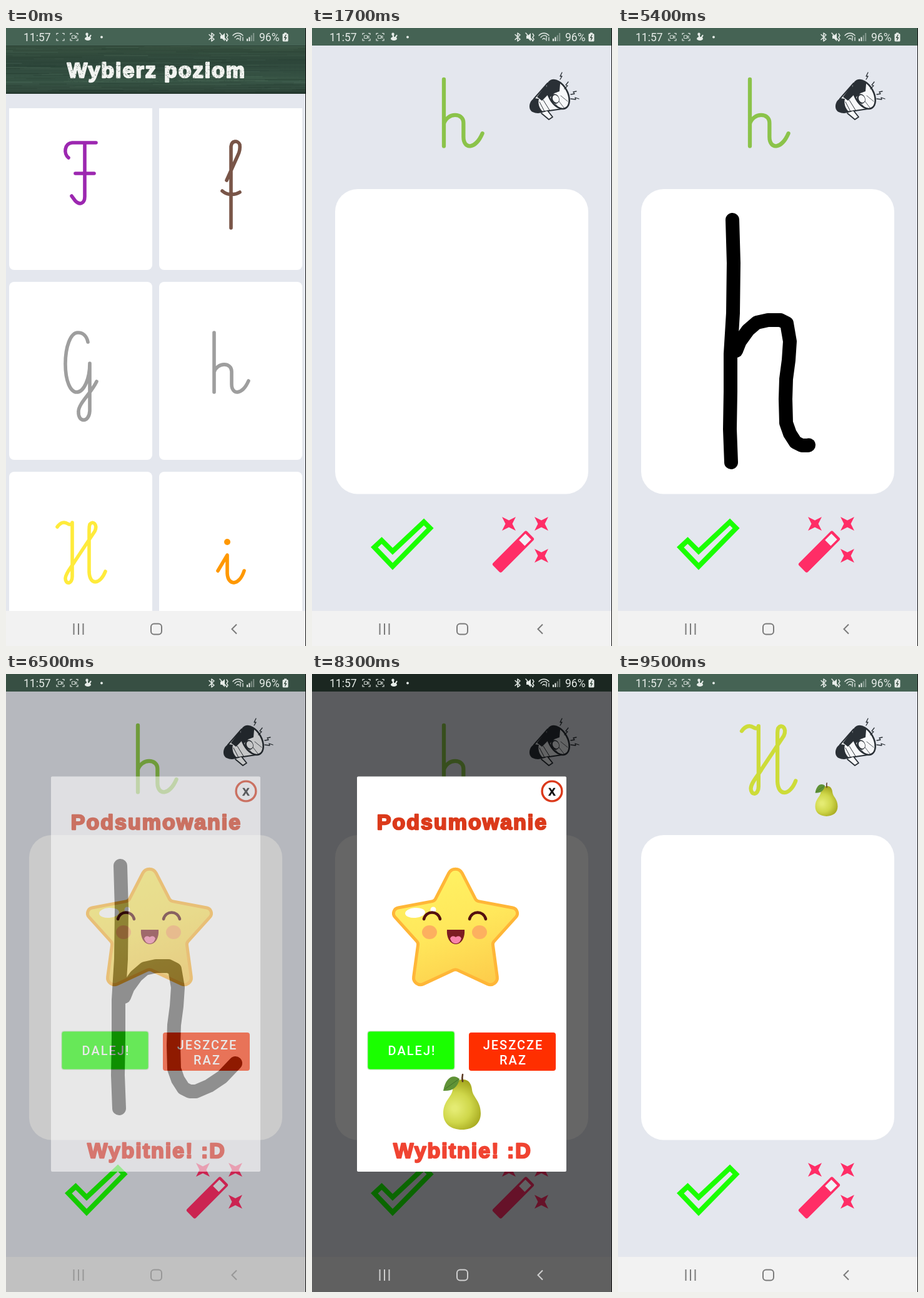
Recreate the animation shown at these times as an HTML page with a canvas. Size 480 px wide and 986 px high, loop 9600 ms.

```html
<!DOCTYPE html>
<html lang="pl">
<head>
<meta charset="utf-8">
<title>Wybierz poziom</title>
<style>
html, body { margin: 0; width: 100%; height: 100%; overflow: hidden; background: #e4e7ee; }
canvas { display: block; }
</style>
</head>
<body>
<canvas id="stage" width="480" height="986"></canvas>
<script>
const W = 480, H = 986, LOOP = 9600, TAU = Math.PI * 2;
const BG = '#e4e7ee', BAR = '#456354', INK = '#2a3036', LIME = '#1aff00', PINK = '#ff2d66', RED = '#db3a1b';
const stage = document.getElementById('stage').getContext('2d');
const HEADING = '"Liberation Sans", Arial, sans-serif';
const LABEL = 'Roboto, sans-serif';

const clamp = v => Math.max(0, Math.min(1, v));
const ramp = (t, from, to) => clamp((t - from) / (to - from));

function layer(paint) {
  const c = document.createElement('canvas');
  c.width = W;
  c.height = H;
  paint(c.getContext('2d'));
  return c;
}

function rect(g, x, y, w, h, color) {
  g.fillStyle = color;
  g.fillRect(x, y, w, h);
}

function round(g, x, y, w, h, r, color) {
  g.fillStyle = color;
  g.beginPath();
  g.roundRect(x, y, w, h, r);
  g.fill();
}

function oval(g, x, y, rx, ry, color, turn = 0) {
  g.fillStyle = color;
  g.beginPath();
  g.ellipse(x, y, rx, ry, turn, 0, TAU);
  g.fill();
}

function line(g, path, width, color, cap = 'round', join = 'round') {
  g.strokeStyle = color;
  g.lineWidth = width;
  g.lineCap = cap;
  g.lineJoin = join;
  g.stroke(new Path2D(path));
}

function shape(g, path, color) {
  g.fillStyle = color;
  g.fill(new Path2D(path));
}

function text(g, str, x, y, font, color, { align = 'center', gap = 0, bold = 0 } = {}) {
  g.font = font;
  g.textAlign = align;
  g.letterSpacing = gap + 'px';
  g.fillStyle = color;
  g.fillText(str, x, y);
  if (bold) {
    g.strokeStyle = color;
    g.lineWidth = bold;
    g.lineJoin = 'round';
    g.strokeText(str, x, y);
  }
  g.letterSpacing = '0px';
}

// Chunky, rounded heading
const heading = (g, str, x, y, color) =>
  text(g, str, x, y, `bold 34px ${HEADING}`, color, { gap: 2, bold: 2.4 });

// Letters, each relative to its first pen point
const LETTERS = {
  F: 'M0 0C-8-6-7-23 6-24H44M26-24V62C26 73 18 76 11 69L5 61M11 25H41',
  f: 'M0 0V-130C1-140 11-140 14-133C15-126 13-120 11-116L-7-76M-14-59C-6-52 6-52 14-57',
  G: 'M0 0C-2-10-8-15-16-15C-28-15-36 8-36 35C-36 62-28 80-18 80C-6 80 3 58 3 34V110C2 129-16 129-15 111C-15 98 5 82 14 63',
  h: 'M0 0V95M0 63C5 47 28 47 28 62V82C28 100 45 100 55 77',
  H: 'M0 0C5-7 11-9 17-5C20-3 24-4 24-7V79C24 92 13 92 13 82C13 74 24 62 28 55L60 7C65-4 57-11 52-4C51-1 51 2 51 5V72C52 94 69 92 77 71',
  i: 'M0 0L15-25V4C16 24 34 25 42 0'
};

function letter(g, name, x, y, color, scale = 1) {
  g.save();
  g.translate(x, y);
  g.scale(scale, scale);
  line(g, LETTERS[name], 5.6, color);
  if (name === 'i') oval(g, 15, -46, 5, 5, color);
  g.restore();
}

function bars(g) {
  rect(g, 0, 0, W, H, BG);
  rect(g, 0, 0, W, 28, BAR);
  rect(g, 0, 930, W, 56, '#f2f2f2');
}

function randomizer(seed) {
  return () => (seed = seed * 16807 % 2147483647) / 2147483647;
}

function chalkboard(g) {
  const rnd = randomizer(7);
  const wash = g.createLinearGradient(0, 28, 0, 105);
  wash.addColorStop(0, '#36503f');
  wash.addColorStop(0.35, '#2d463a');
  wash.addColorStop(0.75, '#385546');
  wash.addColorStop(1, '#2a3f34');
  rect(g, 0, 28, W, 77, wash);
  for (let i = 0; i < 170; i++) {
    const tone = rnd() < 0.55 ? '15,32,24' : '105,140,120';
    rect(g, rnd() * 560 - 80, 28 + rnd() * 76, 30 + rnd() * 130, 0.6 + rnd(), `rgba(${tone},${0.05 + rnd() * 0.14})`);
  }
  rect(g, 0, 28, W, 1, '#2a4034');
  rect(g, 0, 103, W, 2, '#22352b');
}

function chalkDust(g) {
  const rnd = randomizer(31);
  for (let i = 0; i < 420; i++)
    rect(g, 98 + rnd() * 284, 50 + rnd() * 36, 1 + rnd(), 1, 'rgba(48,72,59,.55)');
}

const listPage = layer(g => {
  bars(g);
  chalkboard(g);
  heading(g, 'Wybierz poziom', 241, 79, '#f1f3f0');
  chalkDust(g);
  g.save();
  g.beginPath();
  g.rect(0, 128, W, 802);
  g.clip();
  for (const y of [102, 405, 708])
    for (const x of [5, 245]) round(g, x, y, 229, 284, 8, '#fff');
  letter(g, 'F', 100, 207, '#9c27b0');
  letter(g, 'f', 360, 319, '#795548');
  letter(g, 'G', 131, 501, '#9e9e9e');
  letter(g, 'h', 333, 486, '#9e9e9e');
  letter(g, 'H', 82, 796, '#ffeb3b');
  letter(g, 'i', 339, 866, '#ff9800');
  g.restore();
});

function megaphone(g) {
  const white = '#f7f8fa', tilt = -0.5;
  shape(g, 'M355 113L377 88L398 129L366 134Z', white);
  line(g, 'M355 113L377 88M366 134L400 129', 2, INK);
  shape(g, 'M374 91L360 110L368 116L380 104Z', INK);
  line(g, 'M372 133L364 118M380 131L370 115', 1, INK);
  shape(g, 'M356 112C347 116 345 130 353 134C359 137 366 136 370 134C364 129 361 121 363 113Z', INK);
  shape(g, 'M367 136L379 146L385 142L377 132Z', white);
  line(g, 'M367 136L379 146L385 142L377 132', 1.8, INK);

  g.save();
  g.beginPath();
  g.ellipse(394, 106, 15.5, 25, tilt, 0, TAU);
  g.fillStyle = white;
  g.fill();
  g.clip();
  shape(g, 'M370 78H398L396 101L388 104L377 114Z', INK);
  line(g, 'M392 113L403 127M387 118L397 130M398 108L409 117', 0.8, INK);
  oval(g, 389, 113, 6.5, 8, INK, tilt);
  oval(g, 390, 113, 4.8, 6.2, white, tilt);
  g.restore();
  g.strokeStyle = INK;
  g.lineWidth = 2.6;
  g.beginPath();
  g.ellipse(394, 106, 15, 24.8, tilt, 0, TAU);
  g.stroke();

  line(g, 'M400 71L397 77H400L397 82M410 86L406 91L409 92L404 97M423 101L418 102L420 105L414 106M427 113L421 111L422 114L414 113', 1.3, INK);
}

function wand(g) {
  g.save();
  g.translate(322, 835.5);
  g.rotate(-Math.PI / 4);
  round(g, -38.5, -10, 77, 20, 3, PINK);
  rect(g, 19.5, -6.5, 14.5, 13, '#f1f2f7');
  g.restore();
  for (const [x, y] of [[315, 791], [367, 791], [367, 842]])
    shape(g, `M${x - 11} ${y - 11}l11 5.5l11-5.5l-5.5 11l5.5 11l-11-5.5l-11 5.5l5.5-11Z`, PINK);
}

const lesson = (name, x, y, color) => layer(g => {
  bars(g);
  letter(g, name, x, y, color, 1.12);
  megaphone(g);
  round(g, 37, 257, 405, 486.5, 36, '#fff');
  line(g, 'M99.7 828.5L111.5 817.5L129 835L179 788L189 798L129 859Z', 8, LIME, 'butt', 'miter');
  wand(g);
});

const smallH = lesson('h', 211, 82, '#8bc34a');
const bigH = lesson('H', 198, 91, '#cddc39');

function star(g) {
  const half = [[229.5, 297, 12], [263, 362, 7], [337, 376, 9], [289, 429, 7], [299, 503, 11], [229.5, 471, 7]];
  const pts = half.concat(half.slice(1, 5).reverse().map(([x, y, r]) => [459 - x, y, r]));
  const mid = (a, b) => [(a[0] + b[0]) / 2, (a[1] + b[1]) / 2];
  g.beginPath();
  g.moveTo(...mid(pts[9], pts[0]));
  pts.forEach((p, i) => g.arcTo(p[0], p[1], ...mid(p, pts[(i + 1) % 10]), p[2]));
  g.closePath();
  const glow = g.createLinearGradient(200, 310, 270, 495);
  glow.addColorStop(0, '#fff263');
  glow.addColorStop(0.5, '#ffe75b');
  glow.addColorStop(1, '#fdcd4b');
  g.fillStyle = glow;
  g.fill();
  g.strokeStyle = '#ffb637';
  g.lineWidth = 5;
  g.lineJoin = 'round';
  g.stroke();
  oval(g, 165, 381, 16, 8, '#fff', -0.08);
  oval(g, 194, 376, 4.5, 4.5, '#fff');
  oval(g, 188, 412, 12, 11, '#fdb05f');
  oval(g, 268, 412, 12, 11, '#fdb05f');
  line(g, 'M179 391C183 377 201 377 205 391M252 391C256 377 274 377 278 391', 4.6, '#54100f');
  shape(g, 'M216 408H244C245 421 239 431 230 431C221 431 215 421 216 408Z', '#7d1d22');
  shape(g, 'M221 422C223 417 228 418 230 420C232 418 237 417 239 422C237 428 234 430 230 430C226 430 223 428 221 422Z', '#f884ab');
}

const dialog = layer(g => {
  round(g, 72, 163.5, 335, 630.5, 2, '#fff');
  g.strokeStyle = RED;
  g.lineWidth = 3.4;
  g.beginPath();
  g.arc(384, 187, 15.9, 0, TAU);
  g.stroke();
  text(g, 'X', 384, 193.5, `bold 17px ${HEADING}`, '#111', { bold: 0.6 });
  heading(g, 'Podsumowanie', 240.5, 248, RED);
  star(g);
  round(g, 88.5, 569.5, 140, 62, 4, '#b9dcb4');
  round(g, 89.5, 570.5, 138, 60, 4, LIME);
  round(g, 251, 572, 139, 61, 4, '#ff2f00');
  const face = `500 20px ${LABEL}`;
  text(g, 'DALEJ!', 160, 608, face, '#fff', { gap: 2 });
  text(g, 'JESZCZE', 322, 599, face, '#fff', { gap: 2 });
  text(g, 'RAZ', 322, 623, face, '#fff', { gap: 2 });
  heading(g, 'Wybitnie! :D', 241, 772, '#f04432');
});

function pear(g, x, y, scale) {
  if (scale <= 0) return;
  g.save();
  g.translate(x, y);
  g.scale(scale, scale);
  const skin = g.createRadialGradient(-12, 10, 4, -8, 8, 44);
  skin.addColorStop(0, '#e4eb72');
  skin.addColorStop(0.5, '#cfd74a');
  skin.addColorStop(1, '#a3a51c');
  shape(g, 'M0-36C10-37 15-30 16-20C17-8 30-2 30 18C30 35 17 44 0 44C-17 44-30 35-30 18C-30-2-16-8-15-20C-14-30-9-35 0-36Z', skin);
  line(g, 'M1-33C0-37 0-40 1-44', 2.6, '#5b3a22');
  shape(g, 'M-4-37C-13-45-26-41-30-18C-16-17-7-23-4-37Z', '#5f9236');
  line(g, 'M-6-36L-27-21', 1, '#3f6f27');
  g.restore();
}

// Pen strokes
const STEM = [[183, 306], [185, 375], [184, 455], [180, 520], [180, 580], [179, 640], [181, 693]];
const ARCH = [[189, 515], [195, 500], [208, 482], [222, 470], [240, 466], [260, 466], [270, 471], [275, 500],
  [273, 530], [269, 560], [268, 592], [269, 630], [275, 647], [284, 661], [294, 666], [304, 666],
  [325, 657], [346, 643], [367, 621]];

function penStroke(g, pts, part) {
  const dist = (a, b) => Math.hypot(b[0] - a[0], b[1] - a[1]);
  let left = part * pts.slice(1).reduce((sum, p, i) => sum + dist(pts[i], p), 0);
  g.strokeStyle = '#000';
  g.lineWidth = 22;
  g.lineCap = g.lineJoin = 'round';
  g.beginPath();
  g.moveTo(...pts[0]);
  for (let i = 1; i < pts.length && left >= 0; i++) {
    const [a, b] = [pts[i - 1], pts[i]];
    const k = Math.min(1, left / dist(a, b));
    g.lineTo(a[0] + (b[0] - a[0]) * k, a[1] + (b[1] - a[1]) * k);
    left -= dist(a, b);
  }
  g.stroke();
}

function writing(g, t) {
  if (t >= 2470) penStroke(g, STEM, (1 - Math.cos(Math.PI * ramp(t, 2450, 3420))) / 2);
  if (t >= 4170) penStroke(g, ARCH, ramp(t, 4150, 5700));
}

// New page rises while the old one drifts up and darkens
function slideIn(g, t, start, oldPage, newPage) {
  const p = 1 - Math.pow(1 - ramp(t, start, start + 450), 5.1);
  g.save();
  g.translate(0, Math.round(-16 * p));
  oldPage();
  g.restore();
  rect(g, 0, 0, W, H, `rgba(0,0,0,${0.09 * p})`);
  if (p > 0) g.drawImage(newPage, 0, Math.round(H * (1 - p)));
}

const BLINKS = [[0, 100], [700, 1700], [3700, 4200], [5700, 6200], [7800, 8300]];

function statusIcons(g, t) {
  const c = '#e6ece8', dimmed = 'rgba(230,236,232,.4)';
  text(g, '11:57', 28, 21, `17.5px ${LABEL}`, c, { align: 'left' });
  text(g, '96%', 405, 21, `17.5px ${LABEL}`, c, { align: 'left' });
  const blink = BLINKS.some(([a, b]) => t >= a && t < b);
  for (const x of [81, 103]) {
    line(g, `M${x} 11V8.5H${x + 3}M${x + 9} 8.5H${x + 12}V11M${x + 12} 17V20H${x + 9}M${x + 3} 20H${x}V17`, 1.1, c, 'butt', 'miter');
    if (x === 81 && blink) continue;
    line(g, `M${x + 3} 12H${x + 7.5}V16.5H${x + 3}ZM${x + 7.5} 14.2L${x + 10} 12.5V16Z`, 0.9, c);
  }
  oval(g, 129.5, 10, 2.2, 2.4, c);
  oval(g, 131, 17, 5, 3, c);
  line(g, 'M130 12V16M135.5 12L133 16', 2.2, c);
  oval(g, 153, 14.5, 1.9, 1.9, c);
  line(g, 'M325 10.5L333 18L329 21V8L333 11L325 18.5', 1.5, c);
  shape(g, 'M343 12H346L350 8V21L346 17H343Z', c);
  line(g, 'M342 8L353 20M353 9L355 12L353 15L355 18L353 21', 1.4, c);
  line(g, 'M363 12C367 7 375 7 379 12M366 15C369 11 374 11 376 14M369 18C370 16 372 16 373 18', 1.3, c);
  line(g, 'M375 15V20M379 20V15', 1.3, c);
  [4, 6.5, 9.5, 13].forEach((h, i) => rect(g, 385 + i * 3.4, 21 - h, 2, h, i < 2 ? c : dimmed));
  round(g, 442.5, 9, 9, 12.5, 1.5, c);
  rect(g, 445, 7.5, 4, 2, c);
  line(g, 'M448 11L445.5 15.5H448.5L446.5 19', 1.3, '#34483d');
}

function navIcons(g, dim) {
  const v = Math.round(122 + 85 * dim / 0.6);
  const c = `rgb(${v},${v},${v})`;
  line(g, 'M108.5 950V968M116 950V968M123.5 950V968', 2, c, 'butt');
  g.beginPath();
  g.roundRect(232, 950.5, 17, 17, 5);
  g.stroke();
  line(g, 'M369 951.5L361.5 959L369 966.5', 2, c, 'butt', 'miter');
}

function draw(t) {
  const g = stage;
  const closing = 1 - ramp(t, 8750, 8950);
  const dim = 0.6 * ramp(t, 6400, 6700) * closing;
  const shown = ramp(t, 6400, 6580) * closing;

  if (t < 2000) {
    slideIn(g, t, 950, () => g.drawImage(listPage, 0, 0), smallH);
  } else {
    slideIn(g, t, 8950, () => {
      g.drawImage(smallH, 0, 0);
      writing(g, t);
    }, bigH);
  }
  if (dim > 0) rect(g, 0, 0, W, H, `rgba(0,0,0,${dim})`);
  if (shown > 0) {
    g.globalAlpha = shown;
    g.drawImage(dialog, 0, 0);
    pear(g, 240, 683, ramp(t, 6750, 7200));
    g.globalAlpha = 1;
  }
  pear(g, 333.5, 200.5, 0.6 * ramp(t, 9380, 9500));
  statusIcons(g, t);
  navIcons(g, dim);
  rect(g, 479, 0, 1, H, '#111');
}

const begin = performance.now();
function frame() {
  draw((performance.now() - begin) % LOOP);
  requestAnimationFrame(frame);
}
frame();
</script>
</body>
</html>
```
